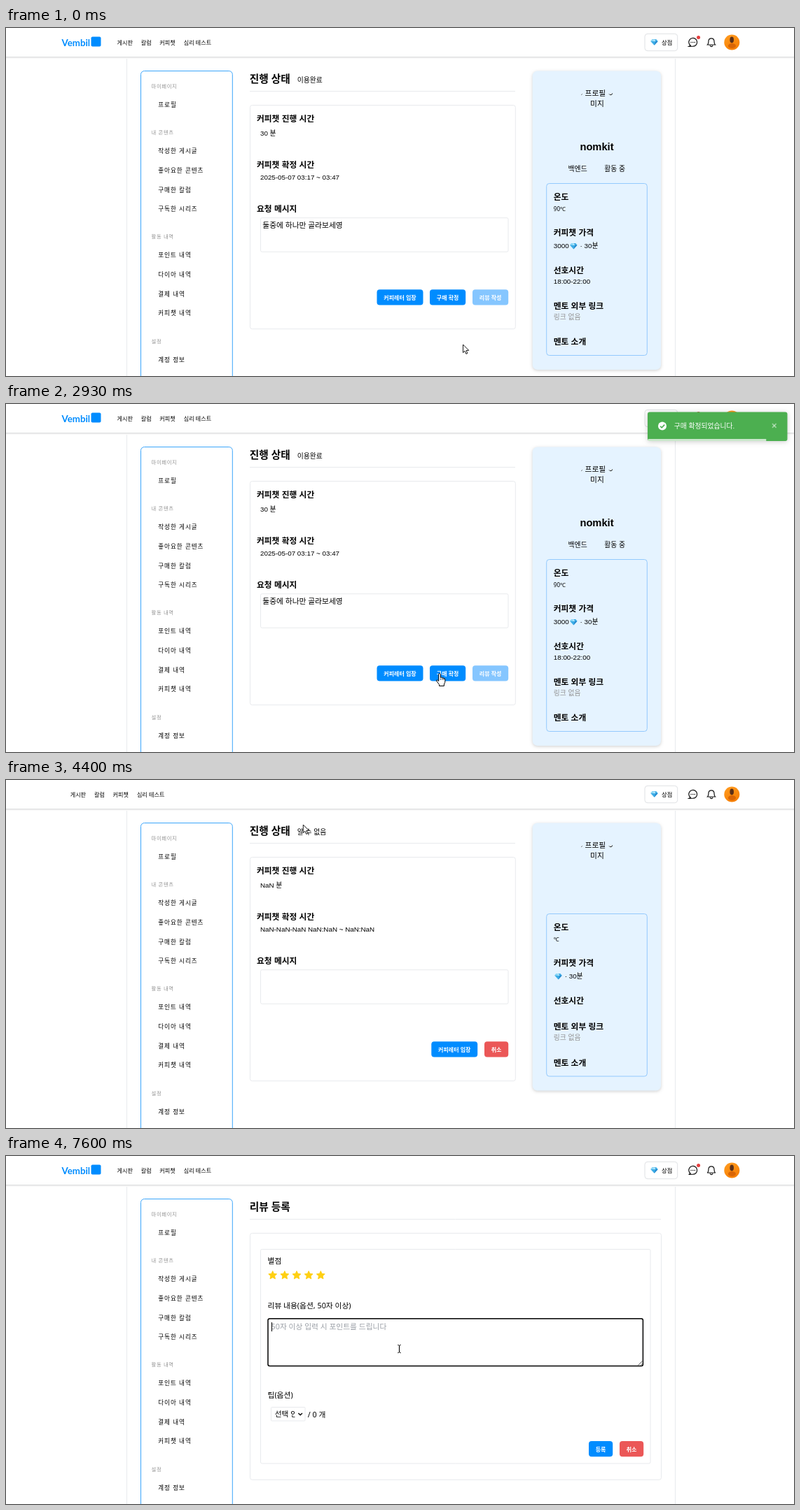
Recreate the animation shown at these times as an HTML page with a canvas. Size 1125 px wide and 498 px high, loop 8000 ms.

```html
<!DOCTYPE html>
<html lang="ko">
<head>
<meta charset="utf-8">
<style>
html, body { margin: 0; width: 100%; height: 100%; overflow: hidden; background: #fff; }
canvas { display: block; width: 1125px; height: 498px; }
</style>
</head>
<body>
<canvas id="stage"></canvas>
<script>
const W = 1125, H = 498, LOOP = 8000, STEP = 1000 / 15;
const BLUE = '#008cff', RED = '#eb5757', GREEN = '#4caf50', LINE = '#e8eaed', GRAY = '#949494';
const FONT = '"Liberation Sans", "Noto Sans CJK KR", "Noto Sans CJK", sans-serif';
const HUMANIST = '"Noto Sans", "Noto Sans CJK KR", "Noto Sans CJK", sans-serif';
const BODY = 9.8, HEAD = 11.75, FORM = 10.75;

const canvas = document.getElementById('stage');
const c = canvas.getContext('2d');
const dpr = window.devicePixelRatio || 1;
canvas.width = W * dpr;
canvas.height = H * dpr;

// cy is the optical middle of the line
function text(s, x, cy, size = BODY, { weight = 400, color = '#000', align = 'left', gap = 0, font = FONT } = {}) {
  c.font = `${weight} ${size}px ${font}`;
  c.letterSpacing = gap + 'px';
  c.textAlign = align;
  c.fillStyle = color;
  c.fillText(s, x, cy + size * 0.37);
}

function box(x0, y0, x1, y1, r, { fill, stroke, width = 1 } = {}) {
  c.beginPath();
  c.roundRect(x0, y0, x1 - x0, y1 - y0, r);
  if (fill) { c.fillStyle = fill; c.fill(); }
  if (stroke) { c.strokeStyle = stroke; c.lineWidth = width; c.stroke(); }
}

function path(points, close) {
  c.beginPath();
  points.forEach(([x, y], i) => i ? c.lineTo(x, y) : c.moveTo(x, y));
  if (close) c.closePath();
}

function line(points, color, width = 1) {
  path(points);
  c.strokeStyle = color;
  c.lineWidth = width;
  c.stroke();
}

function poly(points, color) {
  path(points, true);
  c.fillStyle = color;
  c.fill();
}

function oval(x, y, rx, ry, color) {
  c.beginPath();
  c.ellipse(x, y, rx, ry, 0, 0, 7);
  c.fillStyle = color;
  c.fill();
}

const disc = (x, y, r, color) => oval(x, y, r, r, color);

function shadow(color, blur, dy) {
  c.shadowColor = color;
  c.shadowBlur = blur * dpr;
  c.shadowOffsetY = dy * dpr;
}

const heading = (s, x, cy, size = HEAD) => text(s, x, cy, size, { weight: 700 });
const field = (s, x, cy, color = '#000') => text(s, x, cy, FORM, { color, font: HUMANIST });

function button(s, x0, x1, y, color) {
  box(x0, y, x1, y + 22.2, 4, { fill: color });
  text(s, (x0 + x1) / 2, y + 11.5, 8, { weight: 700, color: '#fff', align: 'center' });
}

function gem(x, y) {
  c.save();
  c.translate(x, y);
  poly([[-3, -4], [3, -4], [5.2, -1.2], [0, 4.4], [-5.2, -1.2]], '#3dade6');
  poly([[-3, -4], [0, -4], [-2, -1.2], [-5.2, -1.2]], '#8ed9f8');
  poly([[0, -4], [2, -1.2], [-2, -1.2]], '#c2edfc');
  poly([[2, -1.2], [5.2, -1.2], [0, 4.4]], '#2585cc');
  c.restore();
}

function header(loaded, alert) {
  c.fillStyle = '#fff';
  c.fillRect(0, 0, W, 41);
  ['#dedfe0', '#efefef', '#f8f8f8'].forEach((color, i) => {
    c.fillStyle = color;
    c.fillRect(0, 41 + i, W, 1);
  });
  if (loaded) {
    text('Vembil', 79.5, 21.5, 13.3, { weight: 700, color: BLUE, font: 'Lato, sans-serif' });
    box(121.5, 12.5, 135.5, 26.5, 2, { fill: BLUE });
  }
  const dx = loaded ? 0 : -66.8;
  [['게시판', 158.5], ['칼럼', 192.8], ['커피챗', 219.3], ['심리 테스트', 253.7]]
    .forEach(([s, x]) => text(s, x + dx, 20.8, 8.1, { weight: 500 }));

  box(912, 8.3, 958.7, 32.7, 4, { stroke: '#dfe1e4' });
  gem(925.5, 20.3);
  text('상점', 936, 21.2, 8.3, { weight: 500 });

  // chat bubble
  c.beginPath();
  c.arc(980.7, 20.3, 5.9, 2.2, 2.2 + 5.6);
  c.lineTo(975, 26.3);
  c.closePath();
  c.strokeStyle = '#111';
  c.lineWidth = 1.2;
  c.stroke();
  [-2.6, 0, 2.6].forEach(d => disc(980.7 + d, 20.5, 0.8, '#111'));
  if (alert) disc(988.6, 13.6, 2.5, '#e53e3e');

  // bell
  c.beginPath();
  c.moveTo(1001.5, 24);
  c.quadraticCurveTo(1003, 22.5, 1003, 19);
  c.bezierCurveTo(1003, 13.4, 1011, 13.4, 1011, 19);
  c.quadraticCurveTo(1011, 22.5, 1012.5, 24);
  c.closePath();
  c.lineWidth = 1.2;
  c.stroke();
  c.beginPath();
  c.arc(1007, 24.5, 2, 0.2, 2.94);
  c.stroke();

  // avatar
  const g = c.createLinearGradient(1030, 10, 1042, 32);
  g.addColorStop(0, '#ff9a1f');
  g.addColorStop(1, '#f57c00');
  disc(1036.3, 20.5, 11, g);
  oval(1036.5, 25.5, 5.5, 3.6, '#d96505');
  oval(1036.2, 17, 2.8, 4.4, '#5a2f18');
}

const MENU = [
  ['마이페이지', 83, 1], ['프로필', 110], ['내 콘텐츠', 149.5, 1], ['작성한 게시글', 176],
  ['좋아요한 콘텐츠', 204], ['구매한 칼럼', 231.5], ['구독한 시리즈', 259], ['활동 내역', 298.5, 1],
  ['포인트 내역', 325], ['다이아 내역', 353], ['결제 내역', 380.5], ['커피챗 내역', 408],
  ['설정', 448, 1], ['계정 정보', 474.5]
];

function frame() {
  line([[172.5, 42], [172.5, H]], LINE);
  line([[955.5, 42], [955.5, H]], LINE);
  box(192.5, 61.5, 323.3, 560, 5, { stroke: '#3ba5fb' });
  for (const [s, y, label] of MENU) {
    if (label) text(s, 207.6, y, 7.35, { color: GRAY, gap: 0.6 });
    else text(s, 217.2, y, 8.55, { gap: 0.98 });
  }
}

function profile(ready) {
  const up = ready ? 0 : 31, up2 = ready ? 0 : 44.5;
  c.save();
  shadow('rgba(0,0,0,.18)', 4, 1.2);
  box(751.7, 61.5, 935, 489 - up2, 7, { fill: '#e5f3ff' });
  c.restore();

  // alt text, cut off by the round image
  field('프로필', 826.5, 93);
  text('미지', 844, 108, FORM, { align: 'center' });
  line([[821.2, 95.8], [822.8, 94.4]], '#666');
  c.beginPath();
  c.arc(863.2, 93.2, 2.5, 0.1, 2.6);
  c.strokeStyle = '#222';
  c.stroke();

  if (ready) {
    text('nomkit', 843.5, 170, 14.7, { weight: 700, align: 'center' });
    text('백엔드', 802.6, 201);
    text('활동 중', 854.2, 201);
  }
  box(771.7, 222.5 - up, 915.3, 468.5 - up2, 4, { stroke: '#93c9fd' });
  heading('온도', 781.7, 242 - up);
  text(ready ? '90℃' : '℃', 781.8, 258.7 - up, 8, { font: HUMANIST });
  heading('커피챗 가격', 781.7, 293 - up);
  if (ready) text('3000', 781.8, 311.5);
  gem(ready ? 810.3 : 788.5, 312 - up);
  text('· 30분', ready ? 819.5 : 797.7, 311.5 - up);
  heading('선호시간', 781.7, 347 - up);
  if (ready) text('18:00-22:00', 781.8, 362.8);
  heading('멘토 외부 링크', 781.7, 397.5 - up2);
  text('링크 없음', 781.8, 413 - up2, BODY, { color: GRAY });
  heading('멘토 소개', 781.7, 448.7 - up2);
}

function detail(state) {
  const ready = state !== 'loading';
  heading('진행 상태', 347.7, 73, 14.7);
  text(ready ? '이용완료' : '알 수 없음', 415.7, 74.7);
  line([[348, 90.5], [727, 90.5]], LINE);
  box(348.5, 110.5, 727.3, 430.7, 3, { stroke: LINE });
  heading('커피챗 진행 시간', 358, 130);
  text(ready ? '30 분' : 'NaN 분', 363, 150.3);
  heading('커피챗 확정 시간', 358, 196);
  text(ready ? '2025-05-07 03:17 ~ 03:47' : 'NaN-NaN-NaN NaN:NaN ~ NaN:NaN', 363, 213.6);
  heading('요청 메시지', 358, 259);
  box(363.5, 271.7, 717, 320.3, 2, { stroke: LINE });
  if (ready) field('둘중에 하나만 골라보세영', 366.3, 282);

  const y = 374.2;
  if (state === 'open') {
    button('커피레터 입장', 529.5, 595.5, y, BLUE);
    button('구매 확정', 605, 656.2, y, BLUE);
    button('리뷰 작성', 666, 717.2, y, '#85c6ff');
  } else if (ready) {
    button('커피레터 입장', 590.5, 656.2, y, BLUE);
    button('리뷰 작성', 666, 717.2, y, BLUE);
  } else {
    button('커피레터 입장', 607.3, 673.2, y, BLUE);
    button('취소', 683, 717.2, y, RED);
  }
  profile(ready);
}

function star(x, y, r) {
  const pts = [];
  for (let i = 0; i < 10; i++) {
    const a = -Math.PI / 2 + i * Math.PI / 5, k = i % 2 ? r * 0.48 : r;
    pts.push([x + k * Math.cos(a), y + k * Math.sin(a)]);
  }
  poly(pts, '#ffd012');
  c.strokeStyle = '#ffd012';
  c.lineWidth = 1;
  c.lineJoin = 'round';
  c.stroke();
}

function review(t) {
  const focus = t >= 6530;
  heading('리뷰 등록', 347.7, 73, 14.7);
  line([[348, 90.5], [935, 90.5]], LINE);
  box(348.5, 110.5, 935.5, 463.3, 3, { stroke: LINE });
  box(363.5, 133.5, 920, 440, 2, { stroke: LINE });
  field('별점', 373.5, 150.5);
  for (let i = 0; i < 5; i++) star(380.7 + 17.15 * i, 170.8, 6.2);
  field('리뷰 내용(옵션, 50자 이상)', 373.5, 214.3);

  box(374, 232.8, 909.4, 300.5, 2.5, focus ? { stroke: '#000', width: 1.5 } : { stroke: '#dfe1e5' });
  field('50자 이상 입력 시 포인트를 드립니다', 378.6, 244.5, '#9a9fa6');
  line([[902.5, 299.5], [908.5, 293.5]], '#444', 0.9);
  line([[906, 299.5], [908.5, 297]], '#444', 0.9);
  const caret = focus && (t < 7066 || t >= 7599);
  if (caret) line([[379.5, 238], [379.5, 251]], '#000');

  field('팁(옵션)', 373.5, 341.7);
  box(378.5, 359.5, 427, 379, 1, { stroke: LINE });
  c.save();
  c.beginPath();
  c.rect(380, 360, 32.5, 18);
  c.clip();
  field('선택 안함', 383.7, 369.5);
  c.restore();
  line([[417.4, 368], [420.2, 370.8], [423, 368]], '#111', 1.5);
  field('/ 0 개', 430.7, 369.7);
  button('등록', 832, 866.2, 408.1, BLUE);
  button('취소', 876, 910.2, 408.1, RED);
}

// bounce in from the right: [share of duration, shift]
const BOUNCE = [[0, 3000], [0.6, -25], [0.75, 10], [0.9, -5], [1, 0]];
const TOAST_START = 2174, TOAST_IN = 750, TOAST_LIFE = 5000;
const easeOut = p => 1 - (1 - p) ** 3;

function toast(t) {
  const age = t - TOAST_START;
  if (age < 0) return;
  const p = Math.min(1, age / TOAST_IN);
  let i = 1;
  while (p > BOUNCE[i][0]) i++;
  const [p0, a] = BOUNCE[i - 1], [p1, b] = BOUNCE[i];
  const e = easeOut((p - p0) / (p1 - p0));

  c.save();
  c.globalAlpha = i === 1 ? e : 1;
  c.translate((a + (b - a) * e) * 0.6125, 0);
  c.save();
  shadow('rgba(0,0,0,.2)', 7, 1);
  box(916, 11.5, 1115.5, 53, 3, { fill: GREEN });
  c.restore();
  disc(937, 31.5, 6, '#fff');
  line([[934, 31.7], [936.2, 33.9], [940.2, 29.6]], GREEN, 1.6);
  text('구매 확정되었습니다.', 953.7, 31.3, BODY, { weight: 500, color: '#fff' });
  line([[1094, 28.2], [1099.6, 33.8]], 'rgba(255,255,255,.45)', 1.7);
  line([[1099.6, 28.2], [1094, 33.8]], 'rgba(255,255,255,.45)', 1.7);
  c.fillStyle = 'rgba(255,255,255,.7)';
  c.fillRect(916.5, 50, 199 * (1 - age / TOAST_LIFE), 3);
  c.restore();
}

// pointer route: [time, x, y]
const ROUTE = [
  [67, 652.5, 453], [200, 565, 450], [300, 508, 428], [400, 545, 402], [533, 618, 387],
  [667, 618, 387], [733, 619, 385.5], [3200, 619, 385.5], [3267, 617, 378], [3500, 530, 250],
  [3867, 366, 56], [3934, 366, -30], [4267, 370, -30], [4333, 395, 10], [4400, 424.3, 64],
  [4600, 590, 190], [4933, 757.2, 333], [5200, 697, 389], [5600, 697, 390], [5800, 684, 389],
  [5934, 684, 389], [6333, 561.5, 276]
];

function pointer(t) {
  const n = ROUTE.findIndex(k => k[0] > t);
  if (n === 0) return ROUTE[0].slice(1);
  if (n < 0) return ROUTE[ROUTE.length - 1].slice(1);
  const [t0, x0, y0] = ROUTE[n - 1], [t1, x1, y1] = ROUTE[n];
  const p = (t - t0) / (t1 - t0);
  return [x0 + (x1 - x0) * p, y0 + (y1 - y0) * p];
}

function outlined(width = 1) {
  c.fillStyle = '#fff';
  c.fill();
  c.strokeStyle = '#000';
  c.lineWidth = width;
  c.lineJoin = 'round';
  c.stroke();
}

function arrow() {
  path([[0, 0], [0, 11.6], [2.6, 9.2], [4.4, 13.4], [6.4, 12.5], [4.6, 8.5], [8.2, 8.3]], true);
  outlined(0.9);
}

function hand() {
  c.beginPath();
  c.moveTo(-1.3, 1);
  c.quadraticCurveTo(0, -1, 1.3, 1);
  c.lineTo(1.3, 6);
  c.quadraticCurveTo(3, 5, 3.8, 6.6);
  c.quadraticCurveTo(5.2, 5.8, 6, 7.3);
  c.quadraticCurveTo(7.8, 7, 8, 9);
  c.quadraticCurveTo(8.2, 13.5, 6.4, 15.5);
  c.lineTo(6.4, 18);
  c.lineTo(-0.5, 18);
  c.lineTo(-0.5, 16);
  c.lineTo(-4.6, 10.5);
  c.quadraticCurveTo(-4.2, 8.4, -1.3, 11);
  c.closePath();
  outlined();
  [1.3, 3.8, 6].forEach(x => line([[x, 7], [x, 9.5]], '#000', 0.7));
}

function beam() {
  line([[-2.2, -5.7], [-0.6, -5.2], [0, -4.5], [0.6, -5.2], [2.2, -5.7]], '#000', 1);
  line([[-2.2, 5.7], [-0.6, 5.2], [0, 4.5], [0.6, 5.2], [2.2, 5.7]], '#000', 1);
  line([[0, -5], [0, 5]], '#000', 1.1);
}

function cursor(t, page) {
  const [x, y] = pointer(t);
  const onRow = y > 374 && y < 396.5;
  const over = (a, b) => onRow && x > a && x < b;
  let shape = arrow;
  if (page === 'open' && (over(529, 595) || over(605, 656))) shape = hand;
  if (page === 'ready' && (over(591, 656) || over(666, 717))) shape = hand;
  if (page === 'review' && y > 232 && y < 301) shape = beam;
  c.save();
  c.translate(x, y);
  shape();
  c.restore();
}

function pageAt(t) {
  if (t < 4260) return 'open';
  if (t < 4330) return 'blank';
  if (t < 4460) return 'loading';
  return t < 5330 ? 'ready' : 'review';
}

function draw(now) {
  const t = Math.floor((now % LOOP + 3.5) / STEP) * STEP;
  const page = pageAt(t);
  c.setTransform(dpr, 0, 0, dpr, 0, 0);
  c.fillStyle = '#fff';
  c.fillRect(0, 0, W, H);
  if (page !== 'blank') {
    frame();
    if (page === 'review') review(t);
    else detail(page);
  }
  header(page !== 'blank' && page !== 'loading', t < 4260 || t >= 4990);
  if (page === 'open') toast(t);
  cursor(t, page);
}

const start = performance.now();
function tick() {
  draw(performance.now() - start);
  requestAnimationFrame(tick);
}
tick();
</script>
</body>
</html>
```
